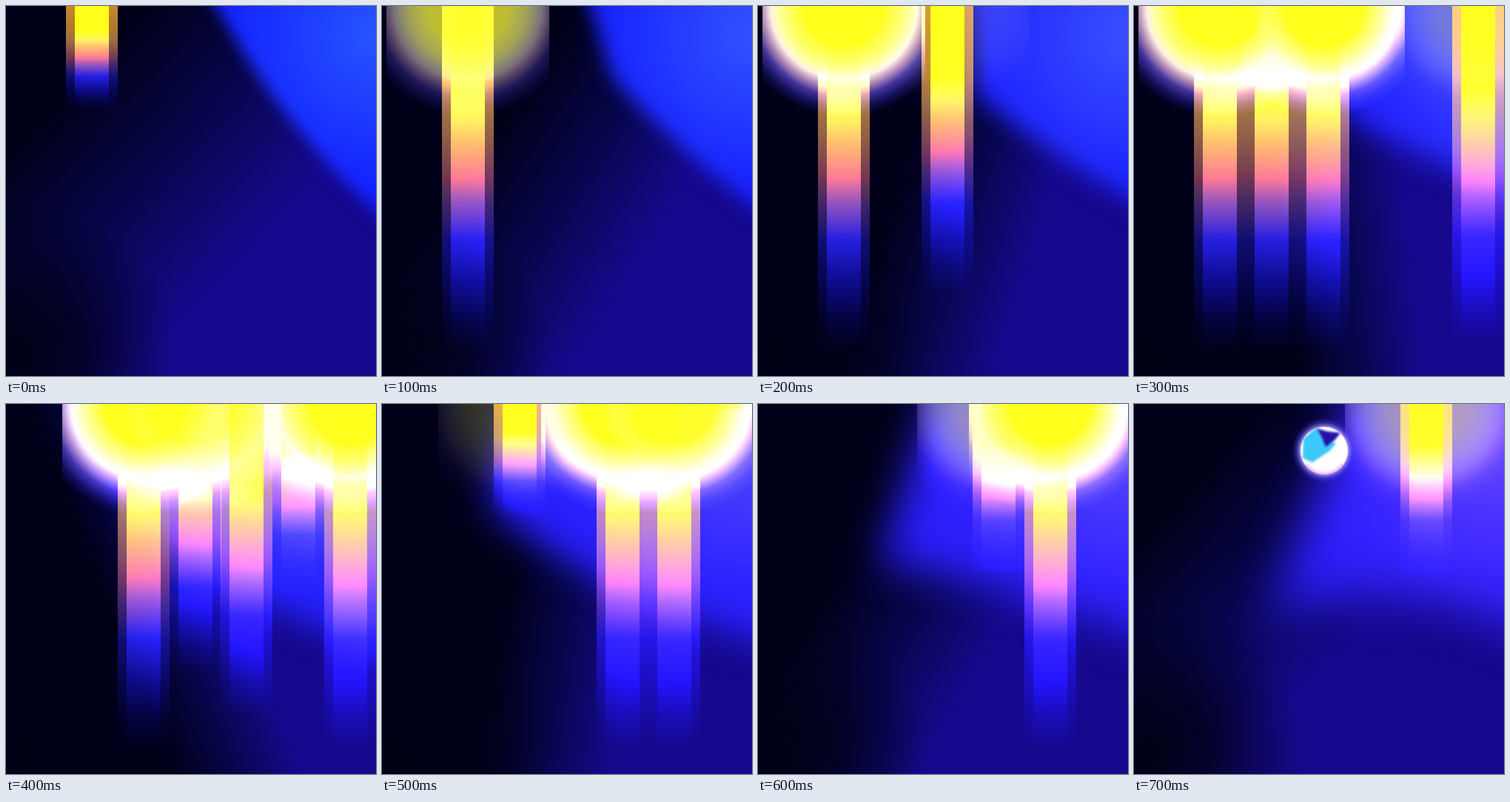
Recreate the animation shown at these times as an HTML page with a canvas. Size 500x500 px, loop 0.8 s.

```html
<!DOCTYPE html>
<html>
<head>
<meta charset="utf-8">
<style>
html, body { margin: 0; width: 100%; height: 100%; overflow: hidden; background: #000018; }
canvas { display: block; width: 100vw; height: 100vh; }
</style>
</head>
<body>
<canvas id="stage" width="500" height="500"></canvas>
<script>
const ctx = document.getElementById('stage').getContext('2d');
const STEP = 100, STEPS = 8, FULL = 465;

// Key poses: axis from dark to deep blue, and the edge of the lit area
const poses = [
  { at: 0, axis: [90, 110, 330, 330], edge: [260, 325, 70, 400, 190, 315] },
  { at: 3, axis: [210, 400, 380, 380], edge: [285, 285, 150, 390, 205, 265] },
  { at: 4, axis: [200, 430, 350, 370], edge: [115, 130, 70, 260, 275, 335] },
  { at: 7, axis: [80, 110, 300, 310], edge: [310, 180, 290, 350, 215, 312] }
];

// Steps at which each bar starts to grow and is gone again
const bars = [[-.3, 4], [2, 5.33], [1.16, 4.78], [3.1, 6.5], [3.44, 7.5], [2.02, 5.05]]
  .map(([on, off], i) => ({ x: Math.round(81 + 69.8 * i), on, off }));

const flame = [[0, '255,255,20'], [.24, '255,255,20'], [.32, '255,240,90'], [.41, '255,180,100'],
  [.5, '255,120,130'], [.57, '150,85,165'], [.68, '36,30,200'], [.8, '14,12,115'], [.9, '4,4,45'], [1, '0,0,0']];
const yellow = [[0, '255,255,25'], [.25, '255,255,25'], [.33, '255,245,95,.85'], [.41, '255,185,105,.55'], [.53, '255,120,140,0']];
const orange = [[0, '255,150,50,.6'], [.3, '255,120,70,.35'], [.5, '255,100,120,0']];
const halo = [[0, '255,255,60'], [.5, '255,255,120'], [.6, '255,255,160'], [.66, '255,240,205'],
  [.73, '185,145,160'], [.82, '65,50,130'], [.91, '18,16,65'], [1, '0,0,0']];
const core = [[0, '255,255,25'], [.55, '255,255,30'], [.8, '255,255,90,.6'], [1, '255,255,150,0']];

const clamp = v => Math.max(0, Math.min(1, v));
const mix = (a, b, k) => a.map((v, i) => v + (b[i] - v) * k);

function paint(g, stops) {
  for (const [p, c] of stops) g.addColorStop(p, c.split(',').length > 3 ? `rgba(${c})` : `rgb(${c})`);
  return g;
}
const linear = (x0, y0, x1, y1, stops) => paint(ctx.createLinearGradient(x0, y0, x1, y1), stops);
const radial = (x, y, r, stops) => paint(ctx.createRadialGradient(x, y, 0, x, y, r), stops);

function fill(style, x = 0, y = 0, w = 500, h = 500, alpha = 1, blend = 'source-over') {
  ctx.globalAlpha = alpha;
  ctx.globalCompositeOperation = blend;
  ctx.fillStyle = style;
  ctx.fillRect(x, y, w, h);
  ctx.globalAlpha = 1;
  ctx.globalCompositeOperation = 'source-over';
}

function background(t) {
  const n = Math.max(1, poses.findIndex(p => p.at >= t));
  const a = poses[n - 1], b = poses[n], k = (t - a.at) / (b.at - a.at);
  fill(linear(...mix(a.axis, b.axis, k), [[0, '0,0,24'], [.5, '8,6,78'], [1, '22,9,142']]));
  fill(radial(20, 470, 210, [[0, '0,0,20'], [.4, '0,0,24,.8'], [1, '0,0,28,0']]));

  const [x0, x1, y1, cx, cy, y2] = mix(a.edge, b.edge, k);
  ctx.filter = `blur(${10 + 3 * t}px)`;
  ctx.fillStyle = radial(500, 40, 420, [[0, `${40 + 9 * t},${85 - 2 * t},255`],
    [.5, `${18 + 5 * t},34,255`], [1, `${18 + 3 * t},24,245`]]);
  ctx.beginPath();
  ctx.moveTo(x0, -120);
  ctx.lineTo(x0, -40);
  ctx.lineTo(x1, y1);
  ctx.quadraticCurveTo(cx, cy, 540, y2);
  ctx.lineTo(640, y2 + 60);
  ctx.lineTo(640, -120);
  ctx.fill();
  ctx.filter = 'none';
}

function bar(x, len) {
  const light = linear(0, 0, 0, len, flame);
  for (const dx of [0, 58]) {
    fill(light, x + dx, 0, 12, len, .45, 'lighter');
    fill(linear(0, 0, 0, len, orange), x + dx, 0, 12, len);
  }
  fill(light, x + 12, 0, 46, len, 1, 'lighter');
  fill(linear(0, 0, 0, len, yellow), x + 12, 0, 46, len);
}

function lamp(x, radius, stops, power, blend) {
  fill(radial(x, 0, radius, stops), x - 110, 0, 220, 180, power, blend);
}

function shape(color, points) {
  ctx.fillStyle = color;
  ctx.beginPath();
  points.forEach(p => ctx.lineTo(...p));
  ctx.fill();
}

function ball(x, y) {
  fill(radial(x, y, 44, [[0, '200,190,255'], [.72, '190,170,255,.9'], [.86, '90,80,230,.4'], [1, '50,40,200,0']]),
    x - 44, y - 44, 88, 88);
  ctx.save();
  ctx.translate(x, y);
  ctx.beginPath();
  ctx.arc(0, 0, 32, 0, 7);
  ctx.fillStyle = '#fff';
  ctx.fill();
  ctx.clip();
  ctx.filter = 'blur(1.5px)';
  shape('#3cc8f8', [[-28, -16], [-10, -32], [0, -14], [16, -10], [8, 0], [-16, 16], [-29, 10]]);
  shape('#2412a8', [[-10, -30], [4, -26], [22, -24], [14, -14], [2, -5], [-3, -17]]);
  ctx.strokeStyle = 'rgba(255,110,225,.6)';
  ctx.lineWidth = 3;
  ctx.beginPath();
  ctx.arc(0, 0, 31, .6, 2.5);
  ctx.stroke();
  ctx.restore();
}

function draw(t) {
  background(t);
  const lit = bars.map(({ x, on, off }) => ({
    x,
    len: FULL * clamp(Math.min(t - on, off - t)),
    power: clamp(Math.min(t - on - .6, off - t)) ** 2 // lamps light up after their bars
  })).filter(b => b.len > 0);
  for (const b of lit) bar(b.x, b.len);
  for (const b of lit) lamp(b.x + 35, 150, halo, b.power, 'lighter');
  for (const b of lit) lamp(b.x + 35, 98, core, b.power);
  if (t === STEPS - 1) ball(257, 63);
}

const start = performance.now();
let shown = -1;
function tick() {
  const t = Math.floor((performance.now() - start) / STEP) % STEPS;
  if (t !== shown) draw(shown = t);
  requestAnimationFrame(tick);
}
tick();
</script>
</body>
</html>
```
